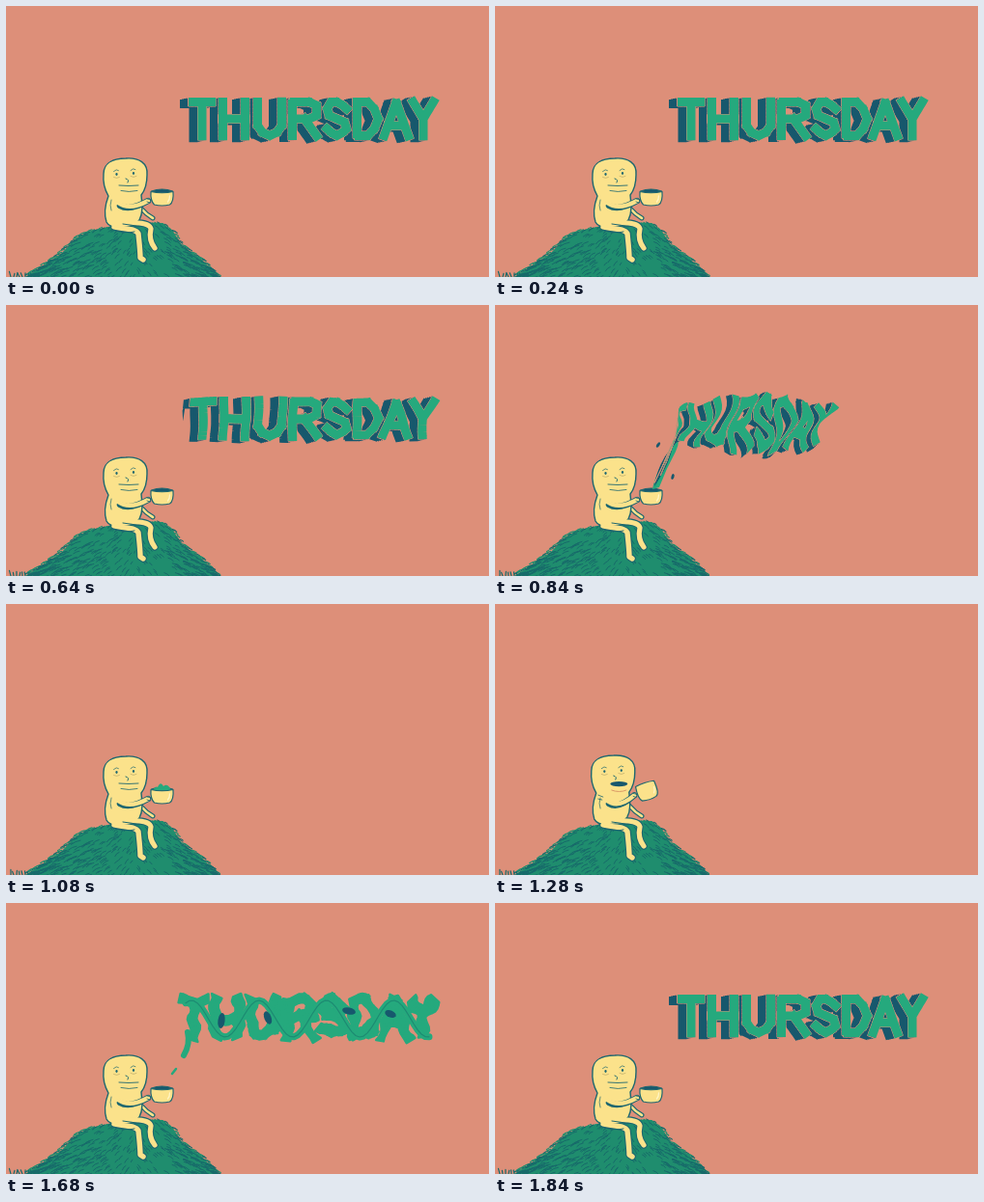
An HTML page with a canvas for the animation above (1920 ms loop, 500 px wide and 281 px high).

```html
<!DOCTYPE html>
<html lang="en">
<head>
<meta charset="utf-8">
<title>Thursday</title>
<style>
html, body { margin: 0; width: 100%; height: 100%; overflow: hidden; background: #dd8f79; }
canvas { display: block; }
</style>
</head>
<body>
<canvas id="stage" width="500" height="281" role="img" aria-label="THURSDAY"></canvas>
<script>
const ctx = document.getElementById('stage').getContext('2d');
const LOOP = 1920;
const BG = '#dd8f79', GREEN = '#25a97d', MOSS = '#1d8b72', NAVY = '#17586d', YELLOW = '#fbe28b',
      LINE = '#1d6770', GRASS = '#1f8d6e', BLADE = '#176a6a';
const { sin, cos, min, max, hypot, PI } = Math;
const clamp = v => min(1, max(0, v));
const mix = (a, b, k) => a + (b - a) * k;

function stroke(path, color, width) {
  ctx.strokeStyle = color;
  ctx.lineWidth = width;
  ctx.stroke(new Path2D(path));
}
function fill(path, color) {
  ctx.fillStyle = color;
  ctx.fill(new Path2D(path));
}
function shape(path, color, width = 1.2) {
  fill(path, color);
  stroke(path, LINE, width);
}
function oval(x, y, rx, ry, color, turn = 0) {
  ctx.fillStyle = color;
  ctx.beginPath();
  ctx.ellipse(x, y, rx, ry, turn, 0, 2 * PI);
  ctx.fill();
}
function random(seed) {
  return () => (seed = seed * 16807 % 2147483647) / 2147483647;
}

// Hill
const ridge = [[20, 281], [40, 268], [58, 256], [72, 241], [84, 234], [110, 228],
               [135, 224], [162, 225], [173, 234], [183, 249], [202, 262], [220, 281]];
function ridgeY(x) {
  const i = max(1, ridge.findIndex(p => p[0] >= x));
  const [a, b] = [ridge[i - 1], ridge[i]];
  return mix(a[1], b[1], (x - a[0]) / (b[0] - a[0]));
}

function drawHill(boil) {
  const rnd = random(77), shake = random(500 + boil * 91);
  fill('M' + ridge.join('L') + 'Z', GRASS);
  const blade = (x, y, len, color, width) => {
    const lean = (x - 135) / 75, side = lean < 0 ? -1 : 1;
    const dx = side * len * min(1, Math.abs(lean) + .25), dy = len * .45;
    const j = shake() - .5;
    stroke(`M${x} ${y}q${dx * .6} ${dy * .2} ${dx + j} ${dy}`, color, width);
  };
  for (let i = 0; i < 75; i++) {
    const x = 24 + i * 2.6;
    blade(x, ridgeY(x) - 1 + rnd() * 2, 3 + rnd() * 4, i % 3 ? GRASS : BLADE, 1.2);
  }
  for (let i = 0; i < 330; i++) {
    const x = 26 + rnd() * 190, top = ridgeY(x) + 2;
    blade(x, mix(top, 281, rnd()), 5 + rnd() * 5, BLADE, 1);
  }
  for (let x = 5; x < 28; x += 3) {
    stroke(`M${x} 281l${shake() * 3 - 2} ${-2 - rnd() * 4}`, BLADE, 1.2);
  }
}

// Stroke letters on a grid from 0 to a (ten): each pair is x, y
const letters = [
  [189, 28, '00a0 505a'],
  [220, 32, '000a a0aa 05a5'],
  [256, 34, '0007295a89a7a0'],
  [292, 34, '0a0070a1a47505 55aa'],
  [328, 29, 'a281502002145596a8895a2908'],
  [359, 31, '000a5a88a5825000'],
  [387, 34, '0a50aa 2787'],
  [417, 30, '0055a0 555a']
];
const TOP = 95, HEIGHT = 44, MID = 117, WEIGHT = 9;

// Each stroke becomes short pieces, so the word can bend
const pieces = [];
for (const [left, width, glyph] of letters) {
  for (const run of glyph.split(' ')) {
    const pts = run.match(/../g).map(s => {
      const [gx, gy] = [...s].map(c => parseInt(c, 16) / 10);
      return [left + WEIGHT / 2 + gx * (width - WEIGHT),
              TOP + WEIGHT / 2 + gy * (HEIGHT - WEIGHT)];
    });
    for (let i = 1; i < pts.length; i++) {
      const [x0, y0] = pts[i - 1], [x1, y1] = pts[i];
      const len = hypot(x1 - x0, y1 - y0), ux = (x1 - x0) / len, uy = (y1 - y0) / len;
      const h = WEIGHT / 2, start = i === 1 ? -h : -h * .6;
      const end = len + (i === pts.length - 1 ? h : h * .6), n = Math.ceil((end - start) / 4);
      for (let k = 0; k < n; k++) {
        const a = mix(start, end, k / n), b = mix(start, end, (k + 1) / n) + .15;
        pieces.push([[a, h], [b, h], [b, -h], [a, -h]]
          .map(([s, o]) => [x0 + ux * s - uy * o, y0 + uy * s + ux * o]));
      }
    }
  }
}

// pull: 0 = word in place, 1 = all in the cup; goo: liquid wobble
function warp(x, y, pull, goo) {
  x += (sin(y * .3 + x * .13) * 2 - 9 * (447 - x) / 258) * goo;
  y += (sin(x * .2) * 3 + 2) * goo;
  if (!pull) return [x, y];
  const e = min(1, pull * 2), k = max(.25, 1 - 1.4 * pull * pull), origin = 181 + 9 * e;
  const u = (x - 181) * k - 130 * pull ** 3
          + ((MID - y) * .25 + sin(y * .15 + x * .04) * 4) * e;
  const bulge = mix(1, .75 + .65 * sin(clamp(u / 165) * PI), e);
  if (u >= 0) return [origin + u, MID + (y - MID) * bulge + (sin(x * .11) * 3 + 6) * e];
  const q = -u / 14;
  if (q >= 1) return null;
  const r = 1 - q, a = min(1, q * 1.5), s = max(.12, .75 - 1.5 * q);
  const cx = r * r * origin + 2 * r * q * 184 + q * q * 163;
  const cy = r * r * 123 + 2 * r * q * 150 + q * q * 192;
  return [cx - sin(a) * (y - MID) * s, cy + cos(a) * (y - MID) * s];
}

function wordPath(shift, drop, pull, goo) {
  const path = new Path2D();
  for (const piece of pieces) {
    const pts = piece.map(([x, y]) => warp(x + shift, y + drop, pull, goo));
    if (pts.includes(null)) continue;
    pts.forEach(([x, y], i) => i ? path.lineTo(x, y) : path.moveTo(x, y));
    path.closePath();
  }
  return path;
}

function drawWord(t) {
  if (t > 1060 && t < 1560) return;
  const rising = t >= 1560;
  const pull = rising ? clamp((1680 - t) / 110) : clamp((t - 610) / 460);
  const goo = rising ? clamp((1800 - t) / 120) : 0;
  if (pull > .2 && pull < .9) {
    fill('M187 128Q193 140 187 152Q177 170 170 189L163 191Q166 176 175 160Q184 146 187 128Z', GREEN);
    if (!rising) fill('M184 146Q181 162 173 175L165 188Q167 172 176 157Z', NAVY);
  }
  if (goo < .8) {
    ctx.fillStyle = NAVY;
    for (const s of [9, 7, 5, 3, 1]) ctx.fill(wordPath(-s, s * .22, pull, goo));
  }
  const front = wordPath(0, 0, pull, goo);
  if (!goo) {
    ctx.strokeStyle = BG;
    ctx.lineWidth = 1;
    ctx.stroke(front);
  }
  ctx.fillStyle = GREEN;
  ctx.fill(front);
  if (goo) {
    ctx.strokeStyle = GREEN;
    ctx.lineWidth = 2.5 * goo;
    ctx.stroke(front);
  }
  if (goo > .8 && !pull) {
    let wave = '';
    for (let x = 186; x < 440; x += 4) wave += (wave ? 'L' : 'M') + x + ' ' + (120 + 19 * sin(x * .09));
    stroke(wave, GREEN, 7);
    stroke(wave, MOSS, 1.2);
    stroke('M188 134Q191 146 184 158', GREEN, 6);
    stroke('M176 172l-4 5', GREEN, 2.5);
    for (const [x, y, rx, turn] of [[223, 122, 8, 1.7], [271, 119, 7, 1.2], [355, 112, 7, .2], [398, 115, 6, .4]])
      oval(x, y, rx, 3.6, NAVY, turn);
  }
  if (!rising && pull > .3 && pull < .8) {
    const fall = (pull - .5) * 50;
    oval(169, 145 + fall, 1.5, 3, NAVY, .6);
    oval(184, 178 + fall * .4, 1.5, 3, NAVY, .3);
  }
}

// Figure
function limb(path, width) {
  stroke(path, LINE, width + 2.4);
  stroke(path, YELLOW, width);
}

function drawFigure(t, sip) {
  const thigh = 'M112 229C123 232 134 230 137 236C138 246 139 254 139 261l3 2';
  const knee = 'M126 225C140 224 149 226 150 231C148 240 150 246 154 251';
  limb('M140 210Q145 216 152 220', 2.6);
  stroke(knee, LINE, 7.4);
  stroke(thigh, LINE, 7.6);

  ctx.save();
  ctx.translate(-1.7 * sip, -1.3 * sip);
  shape('M106 197C102 190 100 184 101 174C101 162 112 158 124 158C138 157 147 163 146 175' +
        'C146 185 144 191 140 196C141 206 142 215 138 222C130 232 108 232 104 224' +
        'C101 215 103 205 106 197Z', YELLOW, 1.4);
  // Face
  for (const [x, y] of [[114.5, 174.5], [132, 173.5]]) {
    oval(x, y, 1.1, 1.4, LINE);
    stroke(`M${x - 3} ${y - 3}q3 -3 5 -1`, LINE, .7);
    stroke(`M${x - 3} ${y + 3}q3 2 6 0`, '#c6b16e', .8);
  }
  stroke('M124 179q4 1 2 4', LINE, 1);
  if (sip > .5) {
    oval(129.5, 187.5, 9, 2.6, NAVY);
    stroke('M122 194q8 3 15 0', '#db9a67', 1);
    stroke('M108 199l5 2M108 203l4 1', LINE, .8);
  } else {
    stroke('M117 186q10 1 20 0', LINE, .9);
    stroke('M119 191.5q8 2 17 0', LINE, .8);
  }
  ctx.restore();

  stroke(knee, YELLOW, 5.2);
  stroke(thigh, YELLOW, 5.4);
  stroke('M113 233Q125 236 133 234M121 226Q131 227 138 229', LINE, 1);

  // Cup, with the word pouring between its rim and its front
  const inCup = draw => {
    ctx.save();
    ctx.translate(161.5 - 5.5 * sip, 199 - 7 * sip);
    ctx.rotate(-.45 * sip);
    draw();
    ctx.restore();
  };
  inCup(() => {
    if (sip < .4) shape('M-11 -7Q0 -11 11 -7Q0 -3 -11 -7Z', NAVY);
  });
  drawWord(t);
  if (t >= 960 && t < 1200) {
    const h = t < 1120 ? 1 : .5;
    fill(`M152 193q3 ${-5 * h} 5 ${-3 * h}q3 ${-7 * h} 6 ${-1 * h}q4 ${-4 * h} 8 ${4 * h}Z`, GREEN);
  }
  inCup(() => {
    shape(sip < .4
      ? 'M-11.5 -6.5Q0 -4 11.5 -6.5C12 0 11 5 8 7Q0 9 -8 7C-11 4 -12 0 -11.5 -6.5Z'
      : 'M-10 -8Q0 -10 10 -8C11 1 10 7 7 8Q0 10 -8 8C-11 5 -11 -1 -10 -8Z', YELLOW);
    stroke('M8 -2q0 4 -2 6', '#fff5c4', 1.3);
  });

  // Arm
  const hx = mix(147, 143, sip), hy = mix(202, 197, sip);
  stroke(`M118 207Q128 213 ${hx} ${hy}`, LINE, 6.4);
  stroke(`M116 204Q128 212.5 ${hx} ${hy}`, YELLOW, 4.4);
  stroke('M109 201q-2 6 0 11', LINE, .7);
  stroke(`M${hx - 1} ${hy - 2}l4 1m-4 2l3 1`, LINE, .8);
}

function frame(now) {
  const t = Math.floor(now % LOOP / 40) * 40;
  const sip = clamp((t - 1180) / 140) * clamp((1560 - t) / 90);
  ctx.lineCap = ctx.lineJoin = 'round';
  ctx.fillStyle = BG;
  ctx.fillRect(0, 0, 500, 281);
  drawHill(Math.floor(t / 80) % 3);
  drawFigure(t, sip);
  requestAnimationFrame(frame);
}
frame(0);
</script>
</body>
</html>
```
